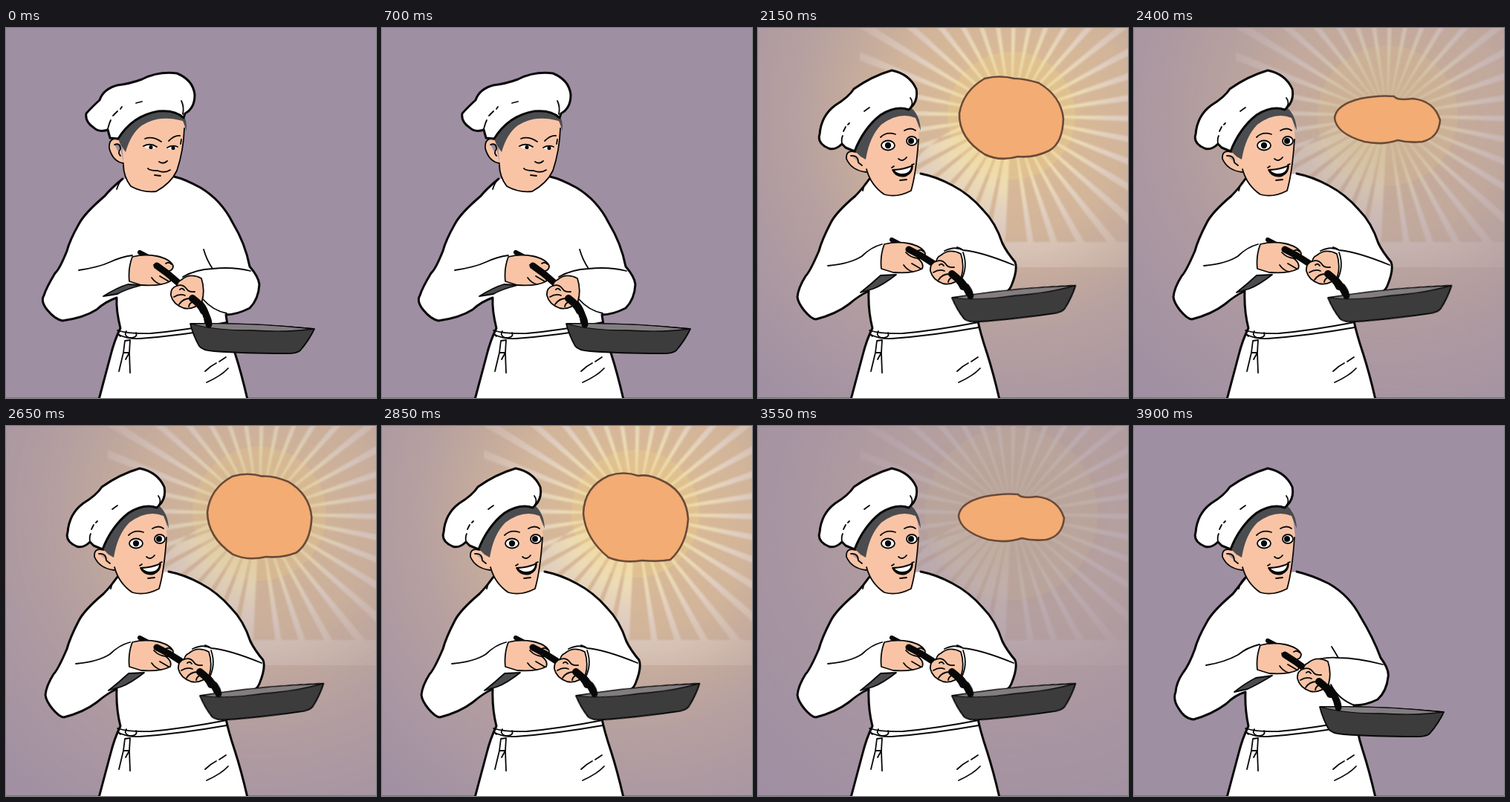
Recreate the animation shown at these times as an HTML page without scripts. Size 498 by 498 pixels, loop 3.95 s.

```html
<!DOCTYPE html>
<html lang="en">
<head>
<meta charset="utf-8">
<title>Chef tossing a pancake</title>
<style>
html, body { margin: 0; width: 100%; height: 100%; overflow: hidden; background: #9f8fa3; }
svg { display: block; width: 100vw; height: 100vh; }
svg * { animation-duration: 3950ms; animation-iteration-count: infinite; animation-timing-function: linear; }

.ink { fill: none; stroke: #080808; stroke-width: 1.8; stroke-linecap: round; stroke-linejoin: round; }
.bold { stroke-width: 3; }
.white { fill: #fff; }
.skin { fill: #f9c4a6; }
.hair { fill: #4b4c4f; }
.black { fill: #080808; }

/* each part carries its own low, mid and high pose: d0-d2 or t0-t2 */
.bend { d: var(--d0); animation-name: bend; }
.move { animation-name: move; }
@keyframes bend {
  0%, 12%, 17.72%, 29.7%, 35.44%, 47.6%, 100% { d: var(--d0); }
  14.6%, 15.4%, 32.3%, 33.1%, 98.73%, 99.99% { d: var(--d1); }
  49.4%, 96.8% { d: var(--d2); }
}
@keyframes move {
  0%, 12%, 17.72%, 29.7%, 35.44%, 47.6%, 100% { transform: var(--t0); }
  14.6%, 15.4%, 32.3%, 33.1%, 98.73%, 99.99% { transform: var(--t1); }
  49.4%, 96.8% { transform: var(--t2); }
}

#body {
  --d0: path("M157,203 Q140,217 133,226 Q105,250 98,264 Q86,285 82,300 Q72,325 66,330 Q54,350 51,360 Q46,368 56,380 Q66,392 76,394 Q105,390 122,379 Q134,368 149,363 Q148,380 154,404 Q146,420 141,440 L125,500 L325,500 Q317,465 308,437 Q299,410 296,386 Q310,386 328,377 Q340,365 341,345 Q340,335 328,321 Q322,290 305,262 Q290,232 262,215 Q240,203 226,200");
  --d1: path("M151,203 Q140,217 133,226 Q105,250 98,264 Q86,285 82,300 Q74,322 66,332 Q57,345 56,358 Q52,368 60,380 Q68,394 80,395 Q105,388 124,374 Q136,362 150,358 Q149,380 154,404 Q146,420 141,440 L125,500 L325,500 Q317,465 308,437 Q299,410 296,376 Q312,376 328,368 Q340,357 342,338 Q344,328 332,312 Q322,285 305,257 Q290,228 262,212 Q240,201 219,196");
  --d2: path("M150,203 Q140,217 131,226 Q105,248 98,262 Q86,285 82,300 Q70,328 64,334 Q54,350 53,362 Q54,370 62,380 Q72,392 78,392 Q105,385 122,372 Q136,360 149,354 Q148,380 154,404 Q146,420 141,440 L125,500 L325,500 Q317,465 308,437 Q299,410 296,394 Q318,370 330,358 Q338,354 341,347 Q350,325 346,315 Q335,302 329,290 Q320,262 303,245 Q285,224 262,212 Q240,200 219,196");
}
#sleeveL {
  --d0: path("M98,326 Q125,322 140,315 Q155,308 170,306");
  --d1: path("M97,322 Q122,318 140,308 Q152,298 169,294");
  --d2: path("M94,320 Q125,317 140,307 Q152,295 167,291");
}
#cuffL {
  --d0: path("M131,361 Q150,349 164,345 L183,346 Q160,352 150,358 Z");
  --d1: path("M135,358 Q150,346 164,339 L186,336 Q166,348 153,354 Z");
  --d2: path("M138,356 Q152,345 165,333 L186,332 Q168,346 155,351 Z");
}
#sleeveR {
  --d0: path("M266,298 Q270,312 278,324 Q255,325 238,335 M278,324 Q305,321 329,327 M265,365 Q278,380 297,384");
  --d1: path("M266,297 Q271,305 275,312 Q255,310 238,318 M275,312 Q300,312 335,321 M265,348 Q275,368 297,376");
  --d2: path("M268,295 Q274,297 276,299 Q265,293 251,300 M276,299 Q300,301 344,319 M276,302 Q283,322 273,340");
}
#handle {
  --d0: path("M203,320 Q218,330 232,343 Q245,355 254,364 Q271,377 272,402");
  --d1: path("M203,308 Q218,317 232,328 Q245,340 254,348 Q272,356 275,382");
  --d2: path("M203,298 Q220,306 236,317 Q250,325 262,332 Q277,340 286,362");
}
#handL { --t0: translate(0, 0); --t1: translate(0, -13px); --t2: translate(0, -17px); }
#handR { --t0: translate(0, 0); --t1: translate(-2px, -20px); --t2: translate(10px, -33px); }
#pan {
  transform-origin: 248px 398px;
  --t0: translate(0, 0) rotate(0deg); --t1: translate(2px, -20px) rotate(0deg); --t2: translate(13px, -35px) rotate(-8deg);
}

#calm { animation-name: calm; animation-timing-function: step-end; }
#happy { animation-name: happy; animation-timing-function: step-end; }
@keyframes calm { 0% { opacity: 1; } 49.37%, 100% { opacity: 0; } }
@keyframes happy { 0% { opacity: 0; } 49.37%, 100% { opacity: 1; } }

#eyes { transform-origin: 209px 161px; animation-name: blink; animation-timing-function: step-end; }
@keyframes blink {
  0%, 16.46%, 34.18%, 100% { transform: none; }
  13.92%, 31.65% { transform: scaleY(.25); }
}

#cake { --thin: path("M270,121 Q272,103 305,95 Q330,90 350,92 Q354,98 375,95 Q404,98 412,124 Q410,148 388,153 Q370,155 355,151 Q335,158 310,153 Q272,142 270,121Z");
  --full: path("M271,115 Q276,85 305,68 Q325,63 345,68 Q358,68 378,74 Q408,92 411,122 Q410,155 392,165 Q372,175 350,173 Q325,180 305,170 Q270,148 271,115Z");
  --wide: path("M271,118 Q272,82 305,67 Q325,60 345,67 Q360,64 382,76 Q410,92 412,125 Q410,160 388,180 Q372,183 350,181 Q325,185 305,177 Q274,152 271,118Z");
  d: var(--thin); fill: #f3ac73; stroke: #6a4a38; stroke-width: 2.6; animation-name: flip; }
@keyframes flip {
  0%, 51.5%, 60.76%, 61.5%, 75.3%, 89.87%, 100% { d: var(--thin); }
  54.43%, 55.5%, 66%, 86% { d: var(--full); }
  58%, 69%, 72.15%, 73%, 81% { d: var(--wide); }
}
#flight { transform-origin: 341px 122px; animation-name: flight; }
@keyframes flight {
  0%, 49.36% { opacity: 0; transform: translateY(238px) scaleY(.3); }
  49.37% { opacity: 1; transform: translateY(238px) scaleY(.3); animation-timing-function: ease-out; }
  53.2%, 91.1% { opacity: 1; transform: translateY(0) scaleY(1); animation-timing-function: ease-in; }
  97.4% { opacity: 1; transform: translateY(238px) scaleY(.3); }
  97.5%, 100% { opacity: 0; transform: translateY(238px) scaleY(.3); }
}

#glow { animation-name: glow; }
@keyframes glow {
  0%, 50% { opacity: 0; }
  54%, 55.5%, 72%, 74% { opacity: 1; }
  60.76%, 62% { opacity: .68; }
  89.87%, 90.5% { opacity: .42; }
  97%, 100% { opacity: 0; }
}
#halo { transform-origin: 341px 118px; animation-name: halo; }
@keyframes halo {
  0%, 50% { transform: scale(.7); }
  54%, 55.5%, 72%, 74% { transform: scale(1); }
  60.76%, 62% { transform: scale(1.1); }
  89.87%, 100% { transform: scale(1.35); }
}
</style>
</head>
<body>
<svg viewBox="0 0 498 498">
  <defs>
    <radialGradient id="warm" gradientUnits="userSpaceOnUse" cx="341" cy="118" r="490">
      <stop offset="0" stop-color="#dfbe94"/>
      <stop offset=".32" stop-color="#dabb98" stop-opacity=".86"/>
      <stop offset=".6" stop-color="#d2b59c" stop-opacity=".45"/>
      <stop offset="1" stop-color="#c8afa2" stop-opacity=".06"/>
    </radialGradient>
    <radialGradient id="beam" gradientUnits="userSpaceOnUse" cx="341" cy="118" r="340">
      <stop offset=".15" stop-color="#f4e0a0" stop-opacity=".8"/>
      <stop offset=".28" stop-color="#f1e2b8" stop-opacity=".85"/>
      <stop offset=".42" stop-color="#e4d7d2" stop-opacity=".7"/>
      <stop offset=".66" stop-color="#dccbc2" stop-opacity=".35"/>
      <stop offset=".95" stop-color="#d6c0b0" stop-opacity="0"/>
    </radialGradient>
    <filter id="soft"><feGaussianBlur stdDeviation="1.1"/></filter>
    <filter id="fuzz"><feGaussianBlur stdDeviation=".6"/></filter>
  </defs>

  <rect width="498" height="498" fill="#9f8fa3"/>
  <g id="glow">
    <rect width="498" height="498" fill="url(#warm)"/>
    <circle id="halo" cx="341" cy="118" r="86" fill="#e8c987" fill-opacity=".45"/>
    <circle cx="341" cy="118" r="170" fill="none" stroke="url(#beam)" stroke-width="340"
      pathLength="36" stroke-dasharray=".28 .72" filter="url(#soft)"/>
  </g>
  <path d="M0,497.5 H498" stroke="#7d7180"/>

  <path id="body" class="ink bold white bend"/>
  <g class="ink">
    <path d="M150,407 Q165,412 195,411 Q240,407 297,396 M152,413 Q165,419 180,418 Q235,414 297,403"/>
    <path d="M154,404 Q148,411 154,415 M162,408 Q158,414 166,417 Q178,417 175,410"/>
    <path d="M160,421 L167,420 L166,437 L158,437 Z M158,437 L152,462 M166,437 L161,446 M166,437 L167,464"/>
    <path d="M270,477 Q290,468 299,458 M268,462 Q275,455 283,451 M287,449 L296,443"/>
  </g>

  <g id="calm">
    <path class="skin" d="M156,150 L158,184 Q161,205 168,214 Q184,222 202,220 Q224,208 231,190 Q240,160 241,127 Q205,108 156,150Z"/>
    <path class="ink" d="M158,184 Q158,200 168,213 Q184,222 202,220 Q222,209 230,192 Q239,165 240,135 M157,203 Q152,207 149,217"/>
    <path class="ink skin" d="M152,150 Q138,146 139,162 Q144,180 158,182 M146,157 Q154,154 154,163 Q150,168 154,172"/>
    <path class="hair" d="M150,147 Q180,104 236,113 Q244,122 243,138 L238,125 Q205,116 183,131 Q168,142 161,167 Q154,158 150,147Z"/>
    <path class="ink bold white" d="M140,148 L137,137 Q125,141 118,134 Q106,126 108,115 Q115,107 126,97 Q131,82 150,77 Q167,75 183,69 Q205,58 230,61 Q252,70 254,90 Q254,108 241,115 L239,121 Q228,110 205,112 Q170,118 151,149 Z"/>
    <path class="ink" d="M137,136 Q139,128 141,124 M144,118 L150,112 M154,109 L156,106 M238,116 Q240,106 236,98 M175,101 L183,99"/>
    <path class="ink" stroke-width="2.4" d="M187,149 Q197,145 209,153 M219,152 Q227,144 234,145 M236,150 L235,156"/>
    <g id="eyes">
      <path class="white" d="M186,160 Q194,154 202,161 Q194,165 186,160 M217,162 Q224,157 231,161 Q225,166 217,162"/>
      <path class="ink" d="M185,159 Q194,154 203,160 M217,161 Q224,157 231,160"/>
      <circle class="black" cx="195" cy="160.500" r="2.6"/><circle class="black" cx="225" cy="161.500" r="2.6"/>
    </g>
    <path class="ink" d="M206,180 Q212,184 217,179 M191,189 Q193,192 204,192 Q214,196 221,191 M200,198 L208,199"/>
  </g>

  <g id="happy">
    <path class="skin" d="M131,165 L147,196 Q155,214 170,224 Q188,229 207,218 Q214,190 217,150 L213,114 Q170,100 131,165Z"/>
    <path class="ink" d="M146,190 Q152,212 170,224 Q187,229 206,219 Q213,195 216,150 M151,203 Q143,208 141,219"/>
    <path class="ink skin" d="M132,167 Q118,163 119,176 Q126,192 146,194 M125,172 Q135,171 135,181 L140,185"/>
    <path class="hair" d="M129,164 Q150,110 203,105 Q218,115 219,138 L212,121 Q190,112 166,130 Q150,146 145,177 L138,173Z"/>
    <path class="ink bold white" d="M118,161 L113,156 Q104,165 95,162 Q79,155 83,143 Q85,118 104,104 Q122,93 129,82 Q153,65 180,57 Q204,62 213,82 Q216,97 206,107 L203,110 Q186,104 165,117 Q142,135 130,166 Z"/>
    <path class="ink" d="M113,156 Q112,149 114,145 M115,139 L118,133 M121,130 L123,128 M205,107 Q210,101 205,94 M143,112 L150,107"/>
    <path class="ink" stroke-width="2.6" d="M165,147 Q173,139 185,143 M197,138 Q206,133 212,138"/>
    <g class="ink white">
      <ellipse cx="175" cy="158" rx="9" ry="6.500"/><ellipse cx="207" cy="152" rx="7" ry="6"/>
    </g>
    <circle class="black" cx="175" cy="158" r="4.200"/><circle class="black" cx="206" cy="152" r="4"/>
    <path class="ink" d="M189,176 Q195,181 200,174 M191,205 L200,204 M180,188 L183,186 M210,183 L207,184"/>
    <path class="ink black" d="M181,191 Q197,190 208,185 Q208,195 199,199 Q186,202 181,191Z"/>
    <path class="white" d="M184,192 Q198,191 206,187 Q205,193 200,195 Q190,198 184,192Z"/>
  </g>

  <path id="sleeveL" class="ink bend"/>
  <path id="cuffL" class="ink hair bend"/>
  <path id="sleeveR" class="ink bend"/>

  <g id="flight"><path id="cake" filter="url(#fuzz)"/></g>

  <g id="handL" class="move">
    <path class="ink" style="stroke-width:6" d="M180,302 L197,311"/>
    <path class="ink skin" d="M170,308 Q186,304 203,307 Q221,311 225,320 Q225,328 215,327 Q224,334 221,341 Q207,348 182,346 L166,341 Q164,324 170,308Z"/>
    <path class="ink" d="M215,327 Q205,326 199,319 M215,317 Q219,314 223,318 M207,334 L219,341 M196,336 Q201,343 208,345"/>
  </g>
  <path id="handle" class="ink bend" style="stroke-width:9"/>
  <g id="handR" class="move">
    <path class="ink skin" d="M236,339 Q248,329 263,337 Q268,352 264,367 Q254,380 239,377 Q225,372 222,360 Q221,350 230,347 Q231,341 236,339Z"/>
    <path class="ink" d="M230,347 Q238,344 243,351 Q246,356 254,355 M226,362 Q234,357 241,360 M233,372 Q238,364 248,364 M246,375 Q247,369 254,368 M234,352 Q237,349 240,353"/>
    <path class="ink" style="stroke-width:10" d="M251,364 Q263,373 266,381"/>
  </g>
  <g id="pan" class="move">
    <path class="ink" fill="#3c3c3d" style="fill:#3c3c3d" d="M248,398 Q330,397 415,405 Q408,420 396,434 Q390,439 375,438 Q320,438 280,435 Q264,434 260,428 Q252,414 248,398Z"/>
    <path class="ink" style="fill:#827d80;stroke-width:1.3" d="M249,398 Q330,396 414,405 Q380,410 330,407 Q280,407 249,398Z"/>
    <path class="ink" style="stroke-width:9" d="M269,386 Q273,393 273,399"/>
  </g>
</svg>
</body>
</html>
```
